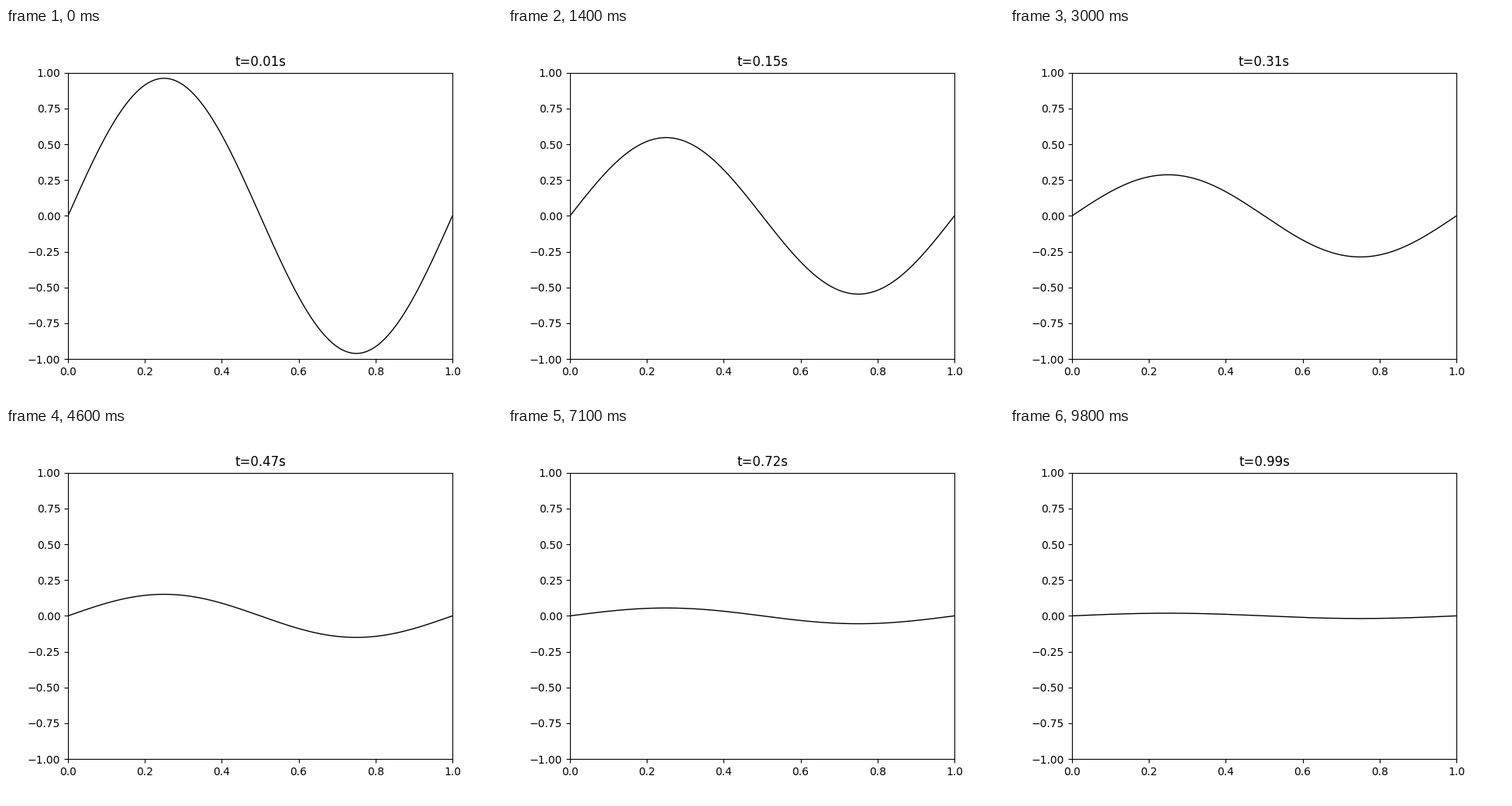
Animation, 640 px wide and 480 px high, one loop 9900 ms. Source, as a matplotlib script:

```python
import matplotlib.pyplot as plt
import numpy as np
from matplotlib.animation import FuncAnimation

FRAMES = 99
INTERVAL = 100  # ms
DT = 0.01
DIFFUSIVITY = 0.1

# Explicit Euler step of the heat equation: each step scales the sine mode.
DECAY = 1 - DIFFUSIVITY * (2 * np.pi) ** 2 * DT

plt.rcParams["font.family"] = "DejaVu Sans"

x = np.linspace(0, 1, 201)
mode = np.sin(2 * np.pi * x)

fig, ax = plt.subplots(figsize=(6.4, 4.8), dpi=100)
ax.set_xlim(0, 1)
ax.set_ylim(-1, 1)
line, = ax.plot(x, mode, color="black", linewidth=1)
title = ax.set_title("")


def update(frame):
    step = frame + 1
    line.set_ydata(mode * DECAY ** step)
    title.set_text(f"t={step * DT:.2f}s")
    return line, title


anim = FuncAnimation(fig, update, frames=FRAMES, interval=INTERVAL,
                     init_func=lambda: update(0), repeat=True, repeat_delay=0)
plt.show()
```
